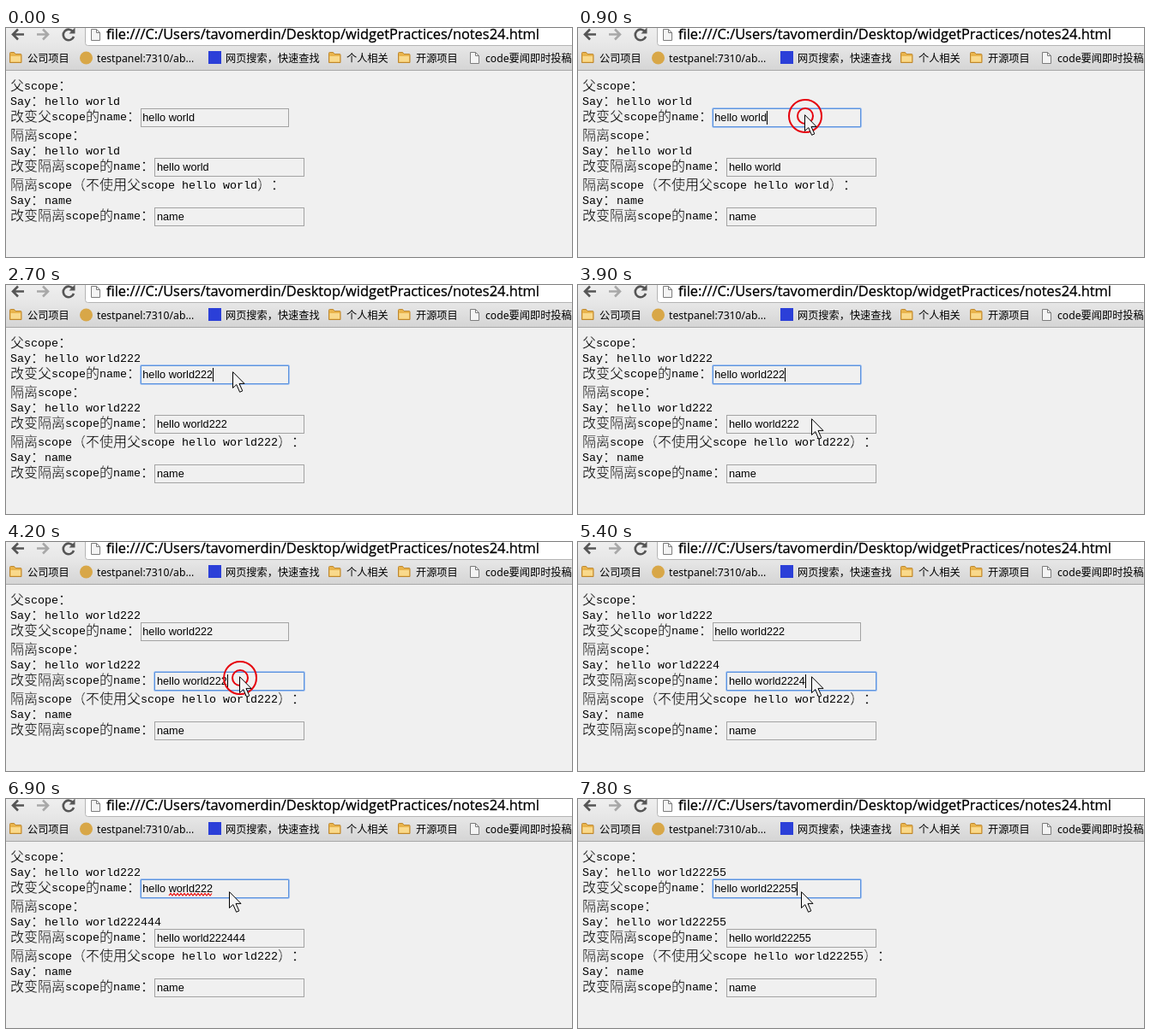
These frames come from a looping animation (660 by 268 pixels, 8 s). An HTML page:

```html
<!DOCTYPE html>
<html lang="zh-CN">
<head>
<meta charset="utf-8">
<title>Scope binding demo</title>
<style>
  html, body { margin: 0; width: 100%; height: 100%; overflow: hidden; background: #f0f0f0; }
  svg { display: block; }
  text { white-space: pre; fill: #000; text-spacing-trim: space-all; }
  .url { font: 16.4px "Open Sans", "Noto Sans", sans-serif; stroke: #000; stroke-width: .3px; }
  .mark { font: 12.2px "Noto Sans", "Noto Sans CJK SC", sans-serif; }
  .row { font: 13.33px "Liberation Mono", monospace; }
  .row .latin { baseline-shift: 1px; }
  /* a thin page-coloured outline slims the strokes */
  .row .han { font: 300 16px "Noto Sans CJK SC", "Noto Sans CJK JP", sans-serif; stroke: #f0f0f0; stroke-width: .35px; }
  .input { font: 12.7px "Liberation Sans", Arial, sans-serif; }
</style>
</head>
<body>
<svg id="stage" width="660" height="268" viewBox="0 0 660 268">
  <defs>
    <linearGradient id="bar" x1="0" y1="0" x2="0" y2="1">
      <stop offset="0" stop-color="#efefef"/>
      <stop offset=".45" stop-color="#e6e6e6"/>
      <stop offset="1" stop-color="#d5d5d5"/>
    </linearGradient>
    <g id="folder">
      <path d="M.5 12.5V1.5Q.5 .5 1.5 .5H5.5L7 2.5H13Q14 2.5 14 3.5V12.5Z" fill="#e9b44c" stroke="#bd8730"/>
      <path d="M1.5 5H13V11.5H1.5Z" fill="#f9d98c"/>
    </g>
    <g id="page" stroke="#7c7c7c">
      <path d="M.5 .5H6.5L10.5 4.5V13.5H.5Z" fill="#f4f4f4"/>
      <path d="M6.5 .5V4.5H10.5" fill="none"/>
    </g>
  </defs>

  <rect width="660" height="268" fill="#f0f0f0"/>
  <rect width="660" height="49" fill="url(#bar)"/>
  <path d="M0 49.5H660" stroke="#a6a6a6"/>
  <path d="M92.5 -2V17.5Q92.5 20.5 95.5 20.5H662V-2Z" fill="#fff" stroke="#b4b4b4"/>

  <g transform="translate(0 1.5)">
    <g fill="none" stroke-width="2.6">
      <path d="M21 6H9M14 0L8 6L14 12" stroke="#555"/>
      <path d="M36 6H48M43 0L49 6L43 12" stroke="#a8a8a8"/>
      <path d="M78.3 3A6.3 6.3 0 1 0 79 8.5" stroke="#555"/>
    </g>
    <path d="M80.5 -2V5H73.5Z" fill="#555"/>
  </g>
  <use href="#page" x="99" y="1"/>
  <text class="url" x="117" y="13">file:///C:/Users/tavomerdin/Desktop/widgetPractices/notes24.html</text>

  <use href="#folder" x="4" y="28"/>
  <use href="#folder" x="376" y="28"/>
  <use href="#folder" x="457" y="28"/>
  <use href="#page" x="541" y="28"/>
  <circle cx="93.5" cy="35" r="7.5" fill="#d8a748"/>
  <rect x="236" y="27" width="15" height="15" fill="#2b3fd8"/>
  <g id="marks"></g>
  <g id="rows"></g>
  <g id="fields"></g>

  <path id="squiggle" fill="none" stroke="#e81010" stroke-width="1.2"/>
  <rect id="caret" width="1" height="16" fill="#000"/>
  <g id="rings" fill="none" stroke="#e6000c" stroke-width="2">
    <circle cx="1" cy="2" r="19"/>
    <circle cx="1" cy="2" r="9"/>
  </g>
  <path id="pointer" d="M.5 .7V19.5L4.8 15.6L8.6 24.3L11.8 22.9L8 14.4H14Z" fill="#f4f4f4" stroke="#000"/>
</svg>

<script>
const LOOP = 8000;
const $ = id => document.getElementById(id);

function add(parent, tag, attrs, content = "") {
  const el = document.createElementNS("http://www.w3.org/2000/svg", tag);
  for (const key in attrs) el.setAttribute(key, attrs[key]);
  el.textContent = content;
  return parent.appendChild(el);
}

function show(el, on) {
  el.style.display = on ? "" : "none";
}

function moveTo(el, point) {
  show(el, !!point);
  if (point) el.setAttribute("transform", `translate(${point})`);
}

// Latin and Chinese runs use different fonts on one 8px grid.
function setRow(row, content) {
  if (row.dataset.content === content) return;
  row.dataset.content = content;
  row.textContent = "";
  for (const run of content.match(/[\x00-\x7f]+|[^\x00-\x7f]+/g))
    add(row, "tspan", { class: run.charCodeAt(0) > 127 ? "han" : "latin" }, run);
}

const marks = [
  [25, "公司项目"], [106, "testpanel:7310/ab..."], [256, "网页搜索，快速查找"],
  [397, "个人相关"], [478, "开源项目"], [559, "code要闻即时投稿"]
];
for (const [x, label] of marks) add($("marks"), "text", { class: "mark", x, y: 40 }, label);

const rows = [73, 91, 109, 131, 149, 167, 189, 207, 225]
  .map(y => add($("rows"), "text", { class: "row", x: 5, y }));

// textX: start of the text, endX: caret place after "hello world"
const fields = [
  { x: 157, y: 94, w: 173, textX: 159.3, endX: 220 },
  { x: 173, y: 152, w: 175, textX: 176, endX: 237 },
  { x: 173, y: 210, w: 175, textX: 176, endX: 237 }
];
function addBox({ x, y, w }, inset, attrs) {
  return add($("fields"), "rect", {
    x: x + inset, y: y + inset, width: w - 2 * inset, height: 22 - 2 * inset, ...attrs
  });
}
for (const f of fields) {
  f.box = addBox(f, .5, { fill: "#f0f0f0" });
  f.glow = addBox(f, -.5, { rx: 1.5, fill: "none", stroke: "#a6c5f2" });
  f.text = add($("fields"), "text", { class: "input", x: f.textX, y: f.y + 15 });
}

let wave = "M190 113";
for (let x = 192, i = 0; x <= 240; x += 2, i++) wave += `L${x} ${i % 2 ? 113 : 110.5}`;
$("squiggle").setAttribute("d", wave);

// Each step changes only what it names.
const steps = [
  { at: 0, parent: "", child: "", focus: -1, caret: false, pointer: null, click: false, typo: false },
  { at: 300, pointer: [206, 177] },
  { at: 600, pointer: [216, 108] },
  { at: 900, pointer: [264, 101], focus: 0, caret: true, click: true },
  { at: 1200, caret: false, click: false },
  { at: 1500, caret: true },
  { at: 2100, parent: "2", child: "2" },
  { at: 2400, parent: "22", child: "22" },
  { at: 2700, parent: "222", child: "222" },
  { at: 3300, caret: false },
  { at: 3600, pointer: [271, 133] },
  { at: 3900, pointer: [272, 156], caret: true },
  { at: 4200, pointer: [272, 157], focus: 1, click: true },
  { at: 4500, caret: false, click: false },
  { at: 4800, caret: true },
  { at: 5400, child: "2224" },
  { at: 6000, child: "22244" },
  { at: 6300, child: "222444", pointer: [271, 152] },
  { at: 6600, pointer: [260, 108], focus: 0, click: true, typo: true },
  { at: 6900, caret: false, click: false },
  { at: 7500, parent: "2225", child: "2225", caret: true, typo: false },
  { at: 7800, parent: "22255", child: "22255" }
];
steps.forEach((step, i) => { steps[i] = { ...steps[i - 1], ...step }; });

function draw(s) {
  const outer = "hello world" + s.parent;
  const inner = "hello world" + s.child;
  [
    "父scope：", "Say：" + outer, "改变父scope的name：",
    "隔离scope：", "Say：" + inner, "改变隔离scope的name：",
    `隔离scope（不使用父scope ${outer}）：`, "Say：name", "改变隔离scope的name："
  ].forEach((content, i) => setRow(rows[i], content));

  [outer, inner, "name"].forEach((value, i) => {
    const f = fields[i];
    const focused = s.focus === i;
    f.text.textContent = value;
    f.box.setAttribute("stroke", focused ? "#5d93dd" : "#a3a3a3");
    show(f.glow, focused);
  });

  show($("caret"), s.caret);
  if (s.caret) {
    const f = fields[s.focus];
    const digits = s.focus ? s.child : s.parent;
    $("caret").setAttribute("x", f.endX + 7 * digits.length);
    $("caret").setAttribute("y", f.y + 3);
  }
  show($("squiggle"), s.typo);
  moveTo($("pointer"), s.pointer);
  moveTo($("rings"), s.click && s.pointer);
}

const start = performance.now();
let current = null;

function tick() {
  const t = (performance.now() - start) % LOOP;
  const step = steps.findLast(s => s.at <= t);
  if (step !== current) draw(current = step);
  requestAnimationFrame(tick);
}
tick();
</script>
</body>
</html>
```
